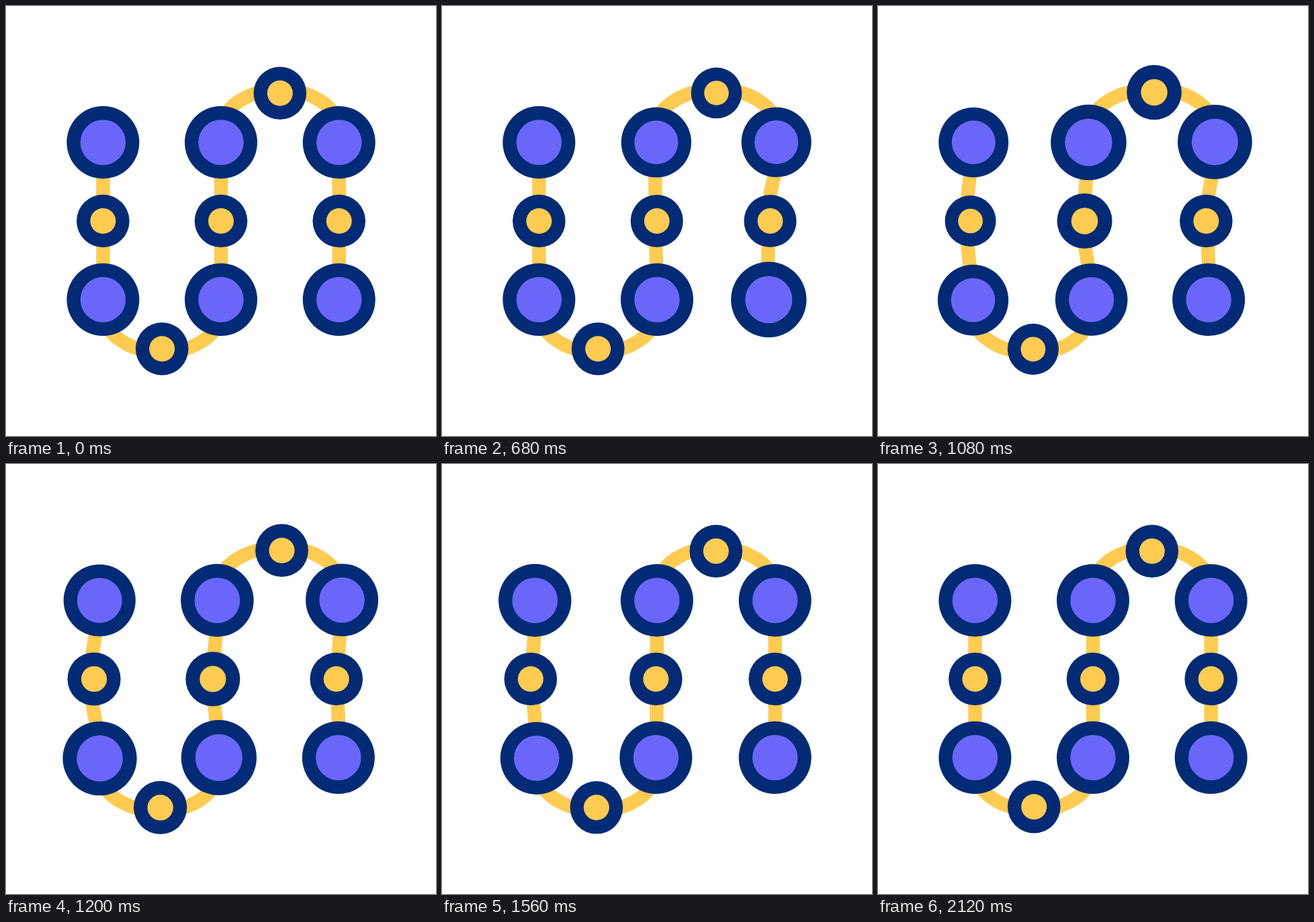
These frames come from a looping animation (640 by 640 pixels, 2840 ms). An HTML page:

```html
<!DOCTYPE html>
<html lang="en">
<head>
<meta charset="utf-8">
<title>Chain wave</title>
<style>
  html, body { margin: 0; width: 100%; height: 100%; overflow: hidden; background: #fff; }
  svg { display: block; width: 100%; height: 100%; }
  .strand, .ray { fill: none; stroke: #ffcb50; stroke-width: 20.4; }
  .ray { stroke-linecap: round; stroke-width: 20; }
  .ring { fill: #032b75; }
  .big { fill: #6b66fa; }
  .small { fill: #ffcb50; }
</style>
</head>
<body>
<svg viewBox="0 0 640 640">
  <path class="strand" id="strand"/>
  <g id="firstRays" transform="translate(495.5 437)"></g>
  <g id="lastRays" transform="translate(144.5 200) rotate(189)"></g>
  <g id="nodes"></g>
</svg>
<script>
const LOOP = 2840, STEP = 40, LEAD = 80;
const BIG = [54, 33.7], SMALL = [39.3, 19];

// Nodes in the order the wave reaches them: place, start of the wave, reach.
const node = (x, y, size, delay, dx, dy = 0) => ({ x, y, size, delay, dx, dy });
const chain = [
  node(495.7, 203, BIG, 505, 6, -.7),
  node(495.7, 320, SMALL, 390, -10),
  node(495.7, 437, BIG, 260, -9.5),
  node(407.8, 129.7, SMALL, 545, 3.3, -1.2),
  node(320, 203, BIG, 560, -6.6),
  node(320, 320, SMALL, 640, -12.5),
  node(320, 437, BIG, 785, -3.2),
  node(232.2, 510.2, SMALL, 875, -3.1, 1.5),
  node(144.4, 437, BIG, 845, -5.4, 1.4),
  node(144.4, 320, SMALL, 880, -16.5),
  node(144.4, 203, BIG, 915, -7.3)
];
const [TR, MR, BR, TT, TM, MM, BM, BB, BL, ML, TL] = chain;

const rays = [
  [-19.5, 73, -33.5, 126],
  [12.5, 68, 43.5, 141],
  [39, 56, 94.5, 91]
];

const clamp = v => Math.min(1, Math.max(0, v));
const ease = (t, from, to) => (1 - Math.cos(Math.PI * clamp((t - from) / (to - from)))) / 2;
const push = t => ease(t, 0, 450) - ease(t, 500, 1050);
const swell = t => 1 - .038 * ease(t, 0, 150) + .085 * ease(t, 150, 480) - .047 * ease(t, 480, 680);

function add(parent, tag, className) {
  const el = document.createElementNS("http://www.w3.org/2000/svg", tag);
  el.setAttribute("class", className);
  return parent.appendChild(el);
}

function set(el, attrs) {
  for (const name in attrs) el.setAttribute(name, attrs[name]);
}

const byId = id => document.getElementById(id);
const strand = byId("strand");
for (const n of chain) {
  n.el = add(byId("nodes"), "g", "node");
  const [outer, inner] = n.size;
  set(add(n.el, "circle", "ring"), { r: outer });
  set(add(n.el, "circle", n.size === BIG ? "big" : "small"), { r: inner });
}
const bursts = [["firstRays", 180], ["lastRays", 1670]].map(([id, start]) => ({
  start,
  lines: rays.map(() => add(byId(id), "line", "ray"))
}));

// The strand runs slightly ahead of the nodes and swings a little wider.
function strandPoint(n, t) {
  const k = push(t - n.delay + LEAD) * 1.1;
  return [n.x + n.dx * k, n.y + n.dy * k];
}

function bend([x1, y1], [x2, y2]) {
  const mid = (y1 + y2) / 2;
  return `C${x1} ${mid} ${x2} ${mid} ${x2} ${y2}`;
}

// Short straight stretch, then two elliptical quarters over the turning point.
function turn([x1, y1], [xm, ym], [x2, y2], dir) {
  const k = .5523, top = ym + dir * 4.8;
  const a = y1 + dir * 18, b = y2 + dir * 18;
  return `L${x1} ${a}` +
    `C${x1} ${a + (top - a) * k} ${xm + (x1 - xm) * k} ${top} ${xm} ${top}` +
    `C${xm + (x2 - xm) * k} ${top} ${x2} ${b + (top - b) * k} ${x2} ${b}L${x2} ${y2}`;
}

function drawStrand(t) {
  const at = n => strandPoint(n, t);
  const column = (...ns) => ns.slice(1).map((n, i) => bend(at(ns[i]), at(n))).join("");
  strand.setAttribute("d", `M${at(TL)}` + column(TL, ML, BL) +
    turn(at(BL), at(BB), at(BM), 1) + column(BM, MM, TM) +
    turn(at(TM), at(TT), at(TR), -1) + column(TR, MR, BR));
}

function drawBurst({ start, lines }, t) {
  const head = ease(t, start, start + 160), tail = ease(t, start + 175, start + 380);
  lines.forEach((line, i) => {
    const [x1, y1, x2, y2] = rays[i];
    const mix = (a, b, k) => a + (b - a) * k;
    set(line, {
      x1: mix(x1, x2, tail), y1: mix(y1, y2, tail),
      x2: mix(x1, x2, head), y2: mix(y1, y2, head),
      visibility: head > tail ? "visible" : "hidden"
    });
  });
}

function draw(time) {
  const t = Math.floor((time % LOOP) / STEP) * STEP;
  drawStrand(t);
  for (const n of chain) {
    const k = push(t - n.delay);
    n.el.setAttribute("transform",
      `translate(${n.x + n.dx * k} ${n.y + n.dy * k}) scale(${swell(t - n.delay)})`);
  }
  for (const burst of bursts) drawBurst(burst, t);
}

const begin = performance.now();
function tick() {
  draw(performance.now() - begin);
  requestAnimationFrame(tick);
}
tick();
</script>
</body>
</html>
```
